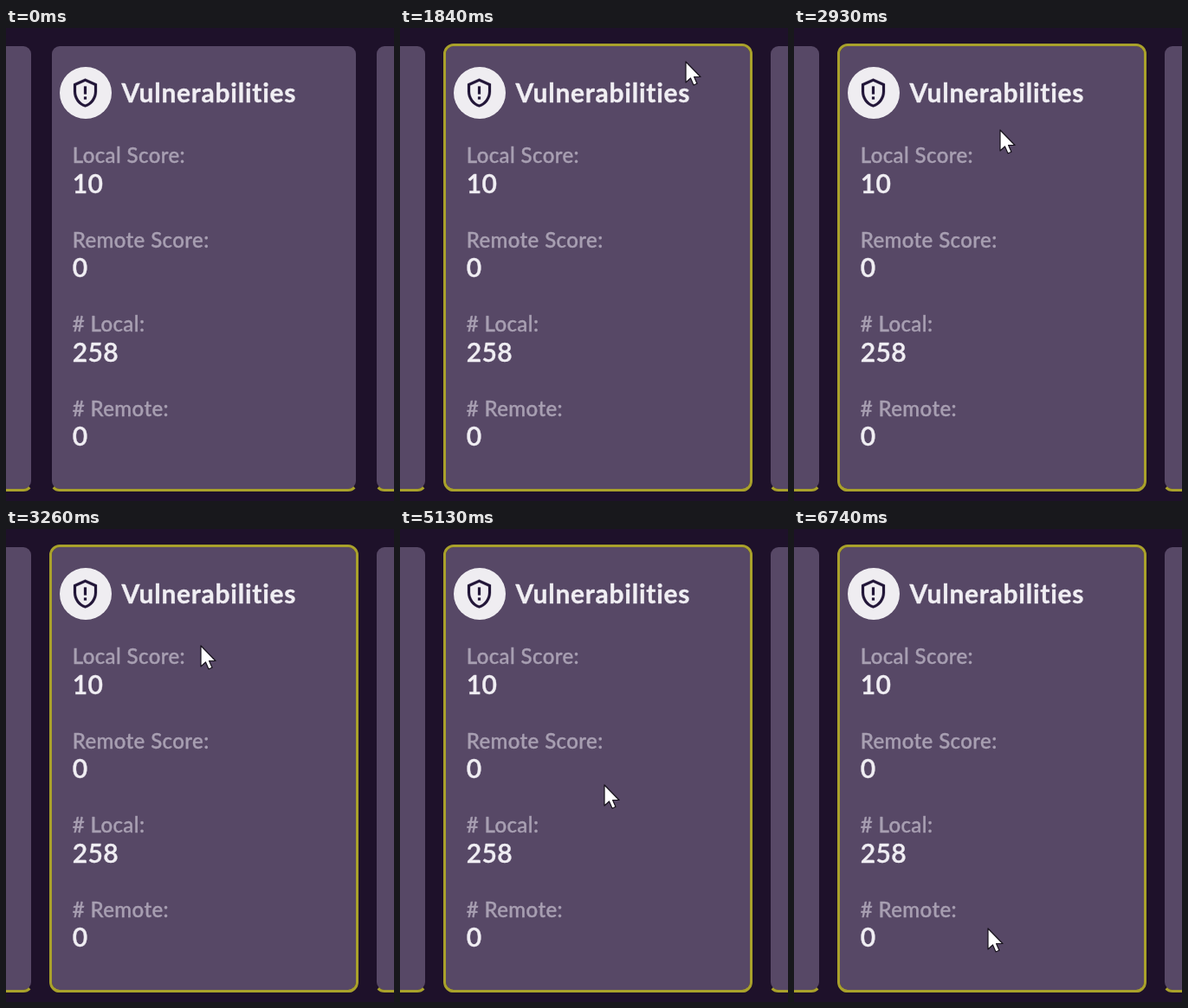
Animation, 448 px wide and 547 px high, one loop 8 s. Source, as an HTML page:

```html
<!DOCTYPE html>
<html lang="en">
<head>
<meta charset="utf-8">
<title>Vulnerabilities card</title>
<style>
  html, body { margin: 0; width: 100%; height: 100%; overflow: hidden; background: #1e112a; }
  svg { display: block; width: 448px; height: 547px; }
  text { font-family: Nunito, Lato, "Open Sans", sans-serif; fill: currentColor; stroke: currentColor; stroke-width: .4; color: #f0eef3; }
  .title { font-size: 30px; font-weight: 700; letter-spacing: .75px; }
  .label { font-size: 24px; font-weight: 500; letter-spacing: .4px; color: #a89fb2; }
  .value { font-size: 30px; font-weight: 600; letter-spacing: .4px; }
  .edge { fill: none; stroke: #a9a12b; stroke-width: 3; }
  .pointer { fill: #fff; stroke: #17121c; stroke-width: 1.2; stroke-linejoin: round; }
</style>
</head>
<body>
<svg viewBox="0 0 448 547">
  <g id="cards"></g>
  <rect id="outline" class="edge" x="51.5" y="19.5" width="354" height="515" rx="10.5"/>
  <circle cx="92" cy="75" r="30" fill="#efedf1"/>
  <path transform="translate(73.5 57) scale(1.5)" fill="#221638" stroke="#221638" stroke-width=".15" fill-rule="evenodd"
    d="M21 11C21 16.55 17.16 21.74 12 23C6.84 21.74 3 16.55 3 11V5L12 1L21 5ZM12 21C15.75 20 19 15.54 19 11.22V6.3L12 3.18L5 6.3V11.22C5 15.54 8.25 20 12 21M11 7h2v6h-2zM11 15h2v2h-2z"/>
  <text class="title" x="133.5" y="85.5">Vulnerabilities</text>
  <g id="stats"></g>
  <path id="chevron" d="M366.5 66.5L375 75L366.5 83.5" fill="none" stroke="#f0eef3" stroke-width="3.2"/>
  <g id="cursor" class="pointer">
    <path id="arrow" d="M0 0V24L5.5 19L9 27L13 25.3L9.6 17.5H17Z"/>
    <path id="hand" d="M-2 3Q-2 0 .5 0Q3 0 3 3V11Q5 9 7 11.5Q9.500 10 11 12.5Q15.5 11.5 15.5 16V22Q15.5 25 13 28V32H0V28Q-3 25 -5 21L-8 17Q-9 13.5 -5.5 13.5L-2 17ZM3 11v5M7 12v5M11 13v4"/>
  </g>
</svg>
<script>
const LOOP = 8000, STEP = 67, CARD_GAP = 375;
const $ = id => document.getElementById(id);
const show = (id, on) => { $(id).style.display = on ? "" : "none"; };

$("cards").innerHTML = [-1, 0, 1].map(i =>
  `<g transform="translate(${i * CARD_GAP})">
    <rect x="53" y="21" width="351" height="512" rx="9" fill="#574866"/>
    <path class="edge" d="M54.6 531.4A10.5 10.5 0 0 0 62 534.5H395A10.5 10.5 0 0 0 402.4 531.4"/>
  </g>`).join("");

const stats = [["Local Score:", 10], ["Remote Score:", 0], ["# Local:", 258], ["# Remote:", 0]];
$("stats").innerHTML = stats.map(([label, value], i) => {
  const y = 156.2 + 97.5 * i;
  return `<text class="label" x="76.7" y="${y}">${label}</text>
    <text class="value" x="76.7" y="${y + 34.7}">${value}</text>`;
}).join("");

// The cursor rests between moves; bend bows a move sideways
const entry = { x: 411, y: -21 };
const moves = [
  { start: 1500, end: 1970, x: 315, y: 50 },
  { start: 2370, end: 3130, x: 224, y: 130 },
  { start: 3200, end: 3530, x: 228, y: 148 },
  { start: 4060, end: 4390, x: 268, y: 240, bend: 1.1 },
  { start: 4520, end: 4660, x: 250, y: 247 },
  { start: 4990, end: 5400, x: 183, y: 352, bend: -.25 },
  { start: 6060, end: 6400, x: 222, y: 465 },
  { start: 6670, end: 6740, x: 224, y: 462 }
];

const smooth = k => k * k * (3 - 2 * k);

function cursorAt(t) {
  const i = moves.findLastIndex(move => t >= move.start);
  const from = moves[i - 1] || entry;
  const { start, end, x, y, bend = 0 } = moves[i];
  const steps = Math.round((end - start) / STEP) + 1;
  const k = smooth(Math.min(1, (Math.floor((t - start + 10) / STEP) + 1) / steps));
  const dx = x - from.x, dy = y - from.y, bow = 2 * k * (1 - k) * bend;
  return [from.x + dx * k - dy * bow, from.y + dy * k + dx * bow];
}

function draw(t) {
  const visible = t >= moves[0].start;
  const [x, y] = visible ? cursorAt(t) : [0, -50];
  const onCard = y >= 18;
  const onHeader = y >= 45 && y <= 105;
  show("cursor", visible);
  show("outline", onCard);
  show("chevron", onHeader);
  show("hand", onHeader);
  show("arrow", !onHeader);
  $("cursor").setAttribute("transform", `translate(${Math.round(x)} ${Math.round(y)})`);
}

const begin = performance.now();
function tick() {
  draw((performance.now() - begin) % LOOP);
  requestAnimationFrame(tick);
}
tick();
</script>
</body>
</html>
```
